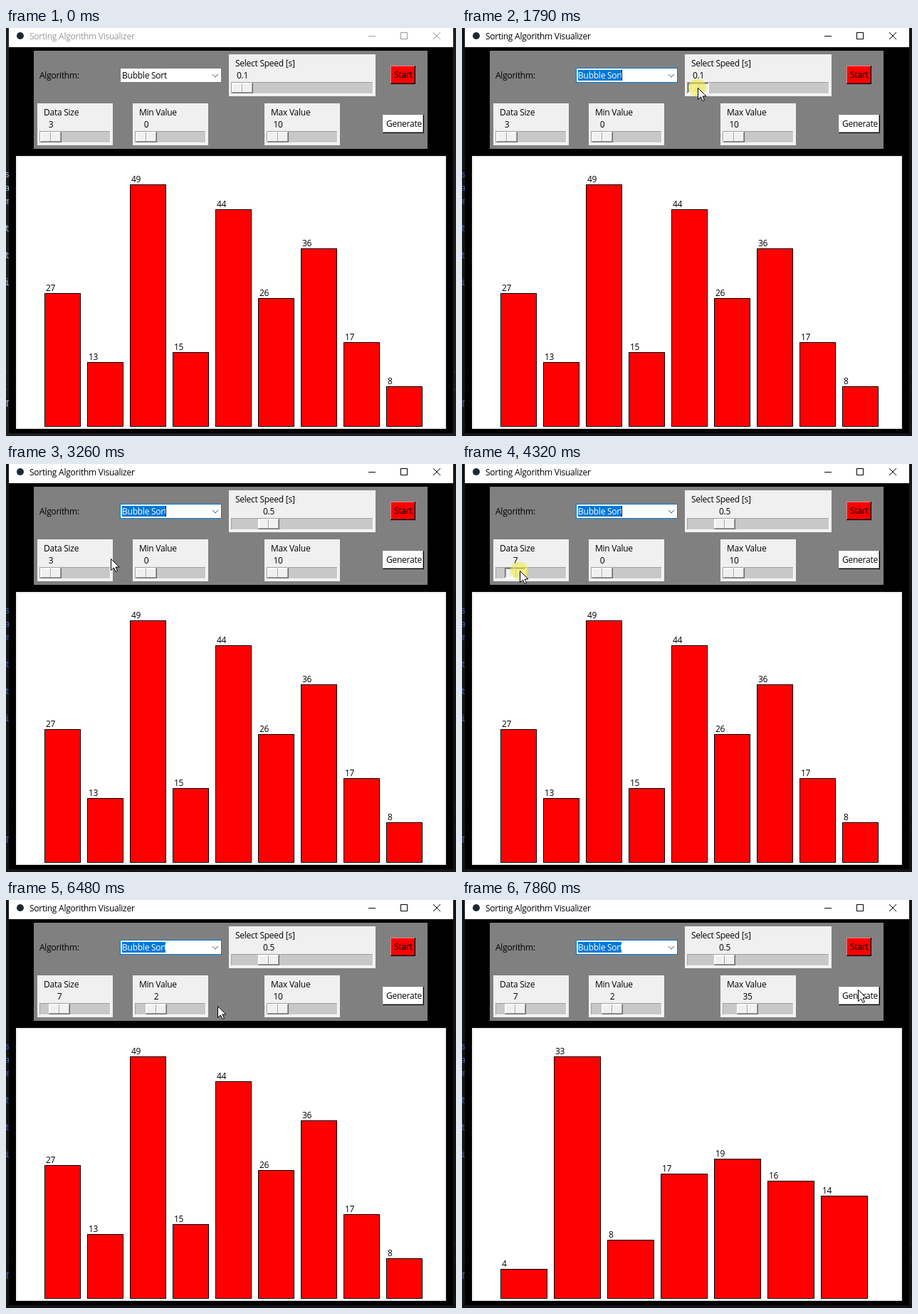
Write an HTML page with a canvas that moves like this. It is 632 px wide and 574 px high and loops after 8 s.

```html
<!DOCTYPE html>
<html lang="en">
<head>
<meta charset="utf-8">
<title>Sorting Algorithm Visualizer</title>
<style>
  html, body { margin: 0; width: 100%; height: 100%; overflow: hidden; background: #000; }
  canvas { display: block; width: 632px; height: 574px; }
</style>
</head>
<body>
<canvas id="stage" width="632" height="574"></canvas>
<script>
const ctx = document.getElementById('stage').getContext('2d');
const LOOP = 8000;
const ENTER = 170;
const ACTIVATE = 1790;
const GENERATE = 7800;
const BLINK = 610;
const SLIDER_LAG = 160;
const UI_FONT = '12px "Open Sans", "Noto Sans", sans-serif';
const CODE_FONT = '12px "DejaVu Sans Mono", monospace';
const BLUE = '#0078d7';
const FACE = '#f0f0f0';

const ENTRY_POINT = [521, 527];
const MOVES = [
  { start: ENTER, end: 940, to: [296, 62] },
  { start: 1300, end: 1590, to: [331, 84] },
  { start: ACTIVATE, end: 2120, to: [388, 85] },
  { start: 2120, end: 2240, to: [367, 86] },
  { start: 2850, end: 3630, to: [68, 150] },
  { start: 3780, end: 4320, to: [81, 150] },
  { start: 5130, end: 5600, to: [201, 147] },
  { start: 5700, end: 5900, to: [213, 146] },
  { start: 6320, end: 6800, to: [381, 152] },
  { start: 6880, end: 7050, to: [400, 152] },
  { start: 7370, end: 7540, to: [556, 126] }
];

const SCALES = [
  { label: 'Select Speed [s]', x: 313, y: 37, w: 206, min: 0.1, perUnit: 93, digits: 1, press: [ACTIVATE, 2690] },
  { label: 'Data Size', x: 44, y: 106, w: 106, min: 3, perUnit: 3.1, digits: 0, press: [3750, 4810] },
  { label: 'Min Value', x: 178, y: 106, w: 106, min: 0, perUnit: 7, digits: 0, press: [5600, 6150] },
  { label: 'Max Value', x: 363, y: 106, w: 106, min: 10, perUnit: 0.76, digits: 0, press: [6830, 7370] }
];
const GENERATE_PRESS = [7740, 7820];
const PRESSES = [...SCALES.map(scale => scale.press), GENERATE_PRESS];
const FIRST_DATA = [27, 13, 49, 15, 44, 26, 36, 17, 8];
const NEXT_DATA = [4, 33, 8, 17, 19, 16, 14];

const clamp = (v, lo, hi) => Math.min(hi, Math.max(lo, v));
const within = (t, [from, to]) => t >= from && t < to;
const easeOut = p => Math.sin(p * Math.PI / 2);

function pointerAt(t) {
  let pos = ENTRY_POINT;
  for (const { start, end, to } of MOVES) {
    const p = easeOut(clamp((t - start) / (end - start), 0, 1));
    pos = pos.map((v, axis) => v + (to[axis] - v) * p);
  }
  return pos;
}

// A slider follows the pointer from where it was grabbed, slightly late.
function scaleValue({ min, perUnit, digits, press }, t) {
  const [grab, release] = press;
  const dragged = pointerAt(clamp(t - SLIDER_LAG, grab, release))[0] - pointerAt(grab)[0];
  return (min + dragged / perUnit).toFixed(digits);
}

function rect(x, y, w, h, fill) {
  ctx.fillStyle = fill;
  ctx.fillRect(x, y, w, h);
}

function outline(x, y, w, h, color) {
  ctx.strokeStyle = color;
  ctx.lineWidth = 1;
  ctx.strokeRect(x + 0.5, y + 0.5, w - 1, h - 1);
}

function text(str, x, y, color = '#000', align = 'left', font = UI_FONT) {
  ctx.font = font;
  ctx.letterSpacing = '-0.25px';
  ctx.textAlign = align;
  ctx.fillStyle = color;
  ctx.fillText(str, x, y);
}

function line(points, color) {
  ctx.beginPath();
  points.forEach(([x, y]) => ctx.lineTo(x, y));
  ctx.strokeStyle = color;
  ctx.lineWidth = 1;
  ctx.stroke();
}

function bevel(x, y, w, h, topLeft, bottomRight) {
  rect(x, y, w, 1, topLeft);
  rect(x, y, 1, h, topLeft);
  rect(x, y + h - 1, w, 1, bottomRight);
  rect(x + w - 1, y, 1, h, bottomRight);
}

function dot(x, y, r, color) {
  ctx.fillStyle = color;
  ctx.beginPath();
  ctx.arc(x, y, r, 0, Math.PI * 2);
  ctx.fill();
}

function drawDesktop(active) {
  rect(0, 0, 632, 574, active ? '#151518' : '#1e1e1e');
  [483, 508].forEach(y => rect(0, y, 632, 1, active ? '#222226' : '#333'));
  [...'sam t t i        T'].forEach((letter, row) =>
    text(letter, 5, 210 + row * 19, active ? '#4a66b0' : '#a4c4d8', 'right', CODE_FONT));
}

function drawWindow(active) {
  const ink = active ? '#000' : '#999';
  rect(4, 0, 624, 570, '#000');
  rect(4, 0, 624, 27, '#fff');
  dot(20, 11, 5, '#1c2a35');
  text('Sorting Algorithm Visualizer', 33, 16, ink);
  rect(509, 11, 10, 1, ink);
  outline(554, 6, 10, 10, ink);
  line([[600, 6], [610, 16]], ink);
  line([[610, 6], [600, 16]], ink);
  rect(39, 32, 553, 138, '#808080');
}

function drawCombo(t, active) {
  const hover = within(t, [920, 1430]);
  text('Algorithm:', 47, 71);
  rect(160, 56, 143, 21, '#fff');
  outline(160, 56, 143, 21, active ? BLUE : hover ? '#222' : '#7a7a7a');
  if (hover) {
    rect(286, 56, 17, 21, '#e5f1fb');
    outline(286, 56, 17, 21, BLUE);
  }
  if (active) rect(163, 59, 61, 15, BLUE);
  text('Bubble Sort', 163, 71, active ? '#fff' : '#000');
  const caretOn = active && Math.floor((t - ACTIVATE) / BLINK) % 2 === 0;
  if (caretOn) rect(224, 59, 1, 15, '#000');
  line([[290, 65], [294, 69], [298, 65]], '#555');
}

function drawScale(scale, t) {
  const { x, y, w } = scale;
  const value = scaleValue(scale, t);
  const thumbX = Math.round(x + 4 + (value - scale.min) * scale.perUnit);
  const top = y + 39;
  rect(x, y, w, 59, FACE);
  text(scale.label, x + 9, y + 17);
  text(value, thumbX + 15, y + 34, '#000', 'center');
  rect(x + 3, top, w - 6, 17, '#c8c8c8');
  bevel(x + 3, top, w - 6, 17, '#a0a0a0', '#fff');

  const pressed = within(t, scale.press);
  const raise = (bx, by, bw, bh, dark) =>
    bevel(bx, by, bw, bh, pressed ? dark : '#fff', pressed ? '#fff' : dark);
  rect(thumbX, top + 1, 30, 15, FACE);
  raise(thumbX, top + 1, 30, 15, '#696969');
  [1, 15].forEach(dx => raise(thumbX + dx, top + 2, 14, 13, '#a0a0a0'));
}

function drawButton(label, x, y, w, colors, pressed) {
  const { face, light, shade } = colors;
  const shift = pressed ? 1 : 0;
  rect(x, y, w, 26, face);
  bevel(x, y, w, 26, pressed ? '#000' : light, pressed ? light : '#000');
  bevel(x + 1, y + 1, w - 2, 24, pressed ? shade : face, pressed ? face : shade);
  text(label, x + 5 + shift, y + 17 + shift);
}

function drawBars(data) {
  rect(14, 180, 604, 384, FACE);
  rect(16, 182, 600, 380, '#fff');
  const pitch = 600 / (data.length + 1);
  const peak = Math.max(...data);
  data.forEach((value, i) => {
    const x = 54 + i * pitch;
    const y = Math.round(560 - value / peak * 340);
    rect(x, y, pitch - 9, 561 - y, '#f00');
    outline(x, y, pitch - 9, 561 - y, '#000');
    text(value, x + 2, y - 3);
  });
}

function drawPointer(t) {
  if (t < ENTER) return;
  const [x, y] = pointerAt(t).map(Math.round);
  if (PRESSES.some(span => within(t, span))) dot(x - 0.5, y, 12.5, 'rgba(240,236,70,0.6)');
  ctx.save();
  ctx.translate(x + 0.5, y + 0.5);
  ctx.beginPath();
  [[0, 0], [0, 16], [4, 12.5], [6.5, 18], [9, 17], [6.5, 11.5], [11.5, 11.5]]
    .forEach(([px, py]) => ctx.lineTo(px, py));
  ctx.closePath();
  ctx.fillStyle = '#fff';
  ctx.fill();
  ctx.strokeStyle = '#000';
  ctx.lineWidth = 1;
  ctx.stroke();
  ctx.restore();
}

function draw(t) {
  const active = t >= ACTIVATE;
  drawDesktop(active);
  drawWindow(active);
  drawCombo(t, active);
  SCALES.forEach(scale => drawScale(scale, t));
  drawButton('Start', 540, 53, 35, { face: '#f00', light: '#f77', shade: '#900' }, false);
  drawButton('Generate', 529, 122, 58, { face: '#fff', light: '#e5e5e5', shade: '#999' },
    within(t, GENERATE_PRESS));
  drawBars(t < GENERATE ? FIRST_DATA : NEXT_DATA);
  drawPointer(t);
}

const start = performance.now();
function tick() {
  draw((performance.now() - start) % LOOP);
  requestAnimationFrame(tick);
}
tick();
</script>
</body>
</html>
```
